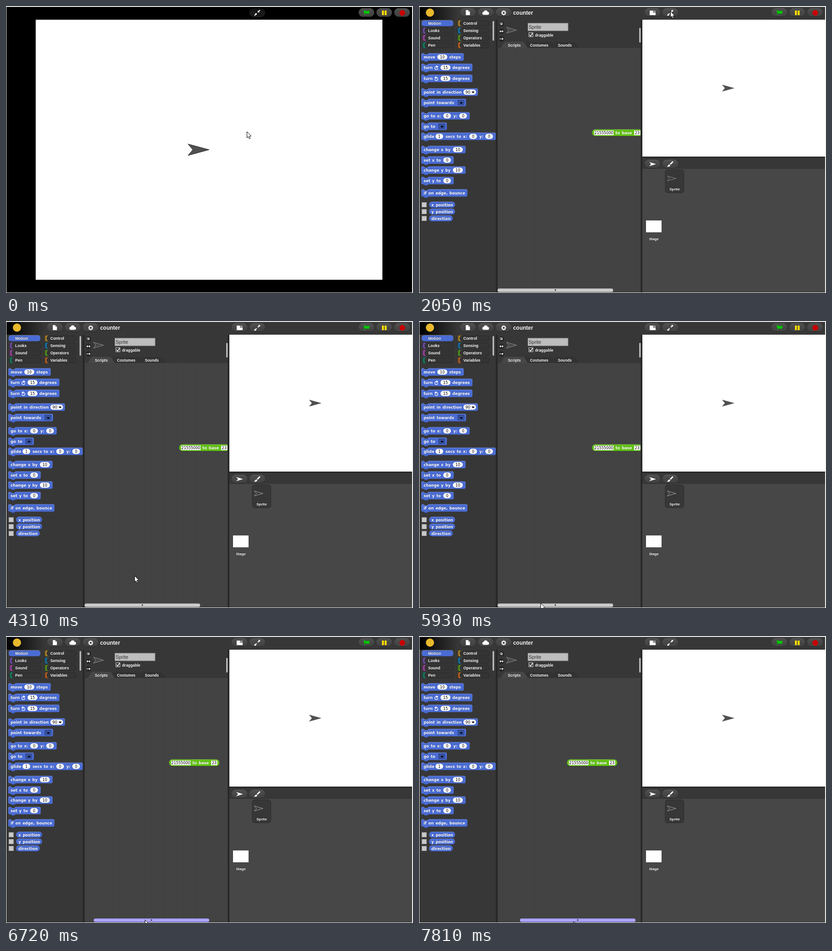
Recreate the animation shown at these times as an HTML page with a canvas. Size 891 by 629 pixels, loop 8000 ms.

```html
<!DOCTYPE html>
<html lang="en">
<head>
<meta charset="utf-8">
<title>Block editor</title>
<style>
  html, body { margin: 0; width: 100%; height: 100%; overflow: hidden; background: #f0f0f0; }
  canvas { display: block; }
</style>
</head>
<body>
<canvas id="view" width="891" height="629"></canvas>
<script>
const ctx = document.getElementById('view').getContext('2d');
const LOOP = 8000;
const SANS = '"Liberation Sans", Arial, sans-serif';
const WIDE = '"DejaVu Sans", Verdana, sans-serif';
const BLUE = '#4a6cd4', GREEN = '#62c213';
const gray = v => `rgb(${v},${v},${v})`;

// ---- drawing helpers ----
function rect(x, y, w, h, fill) {
  ctx.fillStyle = fill;
  ctx.fillRect(x, y, w, h);
}

function frameRect(x, y, w, h, stroke) {
  ctx.strokeStyle = stroke;
  ctx.lineWidth = 1;
  ctx.strokeRect(x, y, w, h);
}

function path(points, fill, stroke, width = 1, open = false) {
  ctx.beginPath();
  points.forEach(([x, y]) => ctx.lineTo(x, y));
  if (!open) ctx.closePath();
  if (fill) { ctx.fillStyle = fill; ctx.fill(); }
  if (stroke) { ctx.strokeStyle = stroke; ctx.lineWidth = width; ctx.stroke(); }
}

function round(x, y, w, h, r, fill, stroke, width = 1) {
  ctx.beginPath();
  ctx.roundRect(x, y, w, h, r);
  if (fill) { ctx.fillStyle = fill; ctx.fill(); }
  if (stroke) { ctx.strokeStyle = stroke; ctx.lineWidth = width; ctx.stroke(); }
}

function disc(x, y, r, fill) {
  ctx.beginPath();
  ctx.arc(x, y, r, 0, Math.PI * 2);
  ctx.fillStyle = fill;
  ctx.fill();
}

function text(str, x, y, font, fill, align = 'left') {
  ctx.font = font;
  ctx.textAlign = align;
  ctx.fillStyle = fill;
  ctx.fillText(str, x, y);
}

function label(str, x, y, size = 8.5, align = 'left') {
  const font = `bold ${size}px ${SANS}`;
  text(str, x - 0.8, y - 0.8, font, 'rgba(0,0,0,.5)', align);
  text(str, x, y, font, '#fff', align);
}

function blockText(str, x, mid) {
  const font = `bold 8.35px ${WIDE}`;
  ctx.wordSpacing = '1.1px';
  text(str, x - 0.8, mid + 2.2, font, 'rgba(0,0,0,.25)');
  text(str, x, mid + 3, font, '#fff');
  ctx.wordSpacing = '0px';
}

function gradient(x0, y0, x1, y1, colors) {
  const g = ctx.createLinearGradient(x0, y0, x1, y1);
  colors.forEach((c, i) => g.addColorStop(i / (colors.length - 1), c));
  return g;
}

const vertical = (y0, y1, ...colors) => gradient(0, y0, 0, y1, colors);
const horizontal = (x0, x1, ...colors) => gradient(x0, 0, x1, 0, colors);
const bevel = (y, h) => vertical(y, y + h, 'rgba(255,255,255,.2)', 'rgba(255,255,255,0)', 'rgba(0,0,0,.25)');

function dart(x, y, w, h, notch, fill, stroke, width) {
  path([[x, y - h], [x + w, y], [x, y + h], [x + notch, y]], fill, stroke, width);
}

// ---- toolbar ----
function pill(cx, cy, pressed) {
  const y = cy - 9.5, base = pressed ? 27 : 71;
  round(cx - 17, y, 34, 19, 9.5,
    vertical(y, y + 19, gray(base + (pressed ? -12 : 8)), gray(base), gray(base - 6)));
  round(cx - 16.5, y + 0.5, 33, 18, 9, null,
    vertical(y, y + 19, pressed ? '#111' : gray(100), gray(pressed ? 44 : 34)));
}

function zoomIcon(cx, cy, inward) {
  for (const s of [-1, 1]) {
    const tip = inward ? 1.3 : 6, tail = inward ? 6 : 1.3, arm = inward ? 5.3 : 2;
    const p = d => [cx + s * d, cy - s * d];
    path([p(tip), p(tail)], null, '#fff', 2, true);
    path([p(tip), [cx + s * arm, cy - s * tip], [cx + s * tip, cy - s * arm]], '#fff');
  }
}

function runButtons() {
  for (const x of [789, 828, 867]) pill(x, 14.5);
  path([[783, 9], [789, 11], [796, 10.5], [795, 17], [789, 17], [785, 15], [786, 20], [784.5, 20]], '#00c800');
  rect(823, 10, 4.3, 10, '#ffdc00');
  rect(829, 10, 4.3, 10, '#ffdc00');
  path(Array.from({ length: 8 }, (_, i) => {
    const a = (i + 0.5) * Math.PI / 4;
    return [867.5 + 6.5 * Math.cos(a), 15 + 6.5 * Math.sin(a)];
  }), '#c80000');
}

function toolbar() {
  rect(1, 2, 888, 28, gray(55));
  rect(1, 2, 167, 28, horizontal(1, 168, '#000', gray(55), gray(55)));
  disc(24, 14.5, 9, '#e8b92c');

  for (const x of [107, 146, 185, 511, 550]) pill(x, 14.5);
  path([[102.5, 9], [108, 9], [111.5, 12.5], [111.5, 20], [102.5, 20]], '#fff');
  path([[108, 9], [108, 12.5], [111.5, 12.5]], gray(130));
  disc(142, 16, 3.3, '#fff');
  disc(146, 13.5, 4, '#fff');
  disc(150, 16, 3.3, '#fff');
  rect(142, 15, 8, 4.3, '#fff');
  for (let i = 0; i < 4; i++) {
    const a = i * Math.PI / 4, x = 5.5 * Math.cos(a), y = 5.5 * Math.sin(a);
    path([[185.5 - x, 15 - y], [185.5 + x, 15 + y]], null, '#fff', 2, true);
  }
  disc(185.5, 15, 4, '#fff');
  disc(185.5, 15, 2.2, gray(60));
  rect(505, 10, 13, 10, '#fff');
  rect(512, 10, 6, 5, gray(150));
  zoomIcon(550, 15, false);
  label('counter', 206, 19, 11.9);
  runButtons();
}

// ---- palette ----
const categories = [
  ['Motion', BLUE], ['Control', '#e6a822'],
  ['Looks', '#8f56e3'], ['Sensing', '#0494dc'],
  ['Sound', '#cf4ad9'], ['Operators', '#62c213'],
  ['Pen', '#00a178'], ['Variables', '#f3761d']
];

// Middle line, right edge, then parts by x: label, [width, value] slot, or icon.
const blocks = [
  [112, 98, { 10: 'move', 40: [22, '10'], 66: 'steps' }],
  [135, 117, { 10: 'turn', 38: 'cw', 47: [22, '15'], 73: 'degrees' }],
  [159, 117, { 10: 'turn', 38: 'ccw', 47: [22, '15'], 73: 'degrees' }],
  [189, 129, { 10: 'point in direction', 97: [28, '90', true] }],
  [212, 103, { 10: 'point towards', 85: 'menu' }],
  [241, 111, { 10: 'go to x:', 53: [17, '0'], 75: 'y:', 88: [17, '0'] }],
  [264, 61, { 10: 'go to', 43: 'menu' }],
  [286, 168, { 10: 'glide', 36: [17, '1'], 58: 'secs to x:', 110: [17, '0'], 132: 'y:', 145: [17, '0'] }],
  [315, 102, { 10: 'change x by', 74: [22, '10'] }],
  [338, 76, { 10: 'set x to', 53: [17, '0'] }],
  [360, 102, { 10: 'change y by', 74: [22, '10'] }],
  [383, 76, { 10: 'set y to', 53: [17, '0'] }],
  [410, 106, { 10: 'if on edge, bounce' }]
];

function blockShape(mid, right) {
  const t = mid - 8.5, b = mid + 8;
  const points = [[5, t + 2], [7, t], [10, t], [13, t + 2.5], [18, t + 2.5], [21, t],
    [right - 2, t], [right, t + 2], [right, b - 2], [right - 2, b],
    [21, b], [18, b + 2.5], [13, b + 2.5], [10, b], [7, b], [5, b - 2]];
  path(points, BLUE);
  ctx.save();
  ctx.clip();
  path(points, null, bevel(t, 18), 2);
  ctx.restore();
}

function turnIcon(x, mid, clockwise) {
  ctx.save();
  ctx.translate(x, mid);
  ctx.scale(clockwise ? 1 : -1, 1);
  ctx.beginPath();
  ctx.arc(0, 1, 3.3, 0, Math.PI * 1.5);
  ctx.strokeStyle = '#fff';
  ctx.lineWidth = 1.2;
  ctx.stroke();
  path([[0, -5], [4.5, -2], [0, 1]], '#fff');
  ctx.restore();
}

function slot(x, mid, [w, value, menu]) {
  round(x, mid - 6, w, 11.5, 5.8, '#fff', 'rgba(0,0,0,.2)', 0.6);
  text(value, x + w / 2 - (menu ? 4 : 0), mid + 3, `8.2px ${WIDE}`, '#000', 'center');
  if (menu) path([[x + 18, mid - 1.5], [x + 25, mid - 1.5], [x + 21.5, mid + 2.5]], '#000');
}

function part(x, mid, item) {
  if (Array.isArray(item)) slot(x, mid, item);
  else if (item === 'cw' || item === 'ccw') turnIcon(x, mid, item === 'cw');
  else if (item === 'menu') {
    rect(x, mid - 6, 14.5, 12, '#37519f');
    path([[x, mid + 6], [x, mid - 6], [x + 14.5, mid - 6]], null, 'rgba(0,0,0,.3)', 1, true);
    path([[x + 4, mid - 1], [x + 11, mid - 1], [x + 7.5, mid + 3]], '#000');
  } else blockText(item, x, mid);
}

function handle(x, y, h) {
  round(x, y, 3.5, h, 1.5, horizontal(x, x + 3.5, gray(160), gray(205), gray(160)));
}

function categoryButton(name, color, x, y, active) {
  if (active) round(x, y, 69, 13, 5, color, bevel(y, 13));
  else {
    ctx.save();
    round(x, y, 71, 13, 5);
    ctx.clip();
    rect(x, y, 12, 13, horizontal(x, x + 7, gray(45), color));
    round(x + 6, y, 72, 13, 5, gray(52));
    ctx.restore();
    round(x + 0.5, y + 0.5, 70, 12, 5, null, 'rgba(0,0,0,.2)');
  }
  label(name, x + 14, y + 9.5);
}

function palette() {
  rect(1, 30, 167, 598, gray(55));
  categories.forEach(([name, color], i) =>
    categoryButton(name, color, i % 2 ? 83 : 6, 31.5 + 16 * (i >> 1), i === 0));
  handle(161, 33, 43);

  ctx.save();
  ctx.beginPath();
  ctx.rect(1, 92, 167, 536);
  ctx.clip();
  for (const [mid, right, parts] of blocks) {
    blockShape(mid, right);
    for (const x in parts) part(+x, mid, parts[x]);
  }
  ['x position', 'y position', 'direction'].forEach((name, i) => {
    const mid = 435.5 + 15 * i;
    rect(6, mid - 5, 10.5, 10.5, gray(200));
    frameRect(6.5, mid - 4.5, 9.5, 9.5, gray(175));
    round(22, mid - 6.5, i < 2 ? 57 : 52, 13, 6.5, BLUE, bevel(mid - 6.5, 13));
    blockText(name, 27, mid);
  });
  ctx.restore();
}

// ---- scripting area ----
function spriteBar() {
  rect(172, 30, 313, 62, gray(55));
  for (const y of [39, 55.5, 72]) disc(180.5, y, 6, gray(38));
  round(177.5, 36.5, 5, 4.5, 1.5, null, '#ddd');
  disc(181, 39.5, 1.6, '#ddd');
  path([[177, 55.5], [184, 55.5]], null, '#fff', 1.2, true);
  path([[179, 53], [176, 55.5], [179, 58]], '#fff');
  path([[182, 53], [185, 55.5], [182, 58]], '#fff');
  path([[176, 72], [184, 72]], null, '#fff', 1.2, true);
  path([[182, 69.5], [185, 72], [182, 74.5]], '#fff');

  dart(191.5, 53, 22, 6.5, 5, gray(70), gray(165), 0.8);
  rect(238, 37.5, 88.5, 17, gray(190));
  frameRect(238.5, 38, 87.5, 16, gray(150));
  text('Sprite', 240, 49.5, `10.6px ${SANS}`, '#333');
  frameRect(240.5, 58.5, 9, 9, gray(215));
  path([[242, 63], [244.5, 66], [248.5, 59.5]], null, '#fff', 1.5, true);
  label('draggable', 254, 66.5, 8.4);
  handle(482, 48, 32);

  [['Sounds', 304, 334, 50], ['Costumes', 243, 283, 50], ['Scripts', 194.5, 222, 71]].forEach(([name, x, end, v]) => {
    path([[x - 15, 92], [x - 9, 81], [x - 6, 78.5], [end + 5, 78.5], [end + 9, 81], [end + 16, 92]], gray(v));
    label(name, x, 88.5, 8.3);
  });
}

function reporter(x) {
  round(x, 270.5, 110, 14.5, 7.2, GREEN, bevel(270.5, 14.5));
  rect(x + 4.5, 273, 42.5, 10, '#fff');
  rect(x + 92, 273, 13.5, 10, '#fff');
  text('21555000', x + 5, 281, `8.1px ${WIDE}`, '#000');
  text('23', x + 93.5, 281, `8.1px ${WIDE}`, '#000');
  blockText('to base', x + 51, 278);
}

function scripts(shift, lit) {
  ctx.save();
  ctx.beginPath();
  ctx.rect(172, 92, 313, 536);
  ctx.clip();
  rect(172, 92, 313, 536, gray(71));
  const pitch = 10 / 3;
  for (let x = 172; x < 485; x += pitch) rect(x, 92, pitch / 4, 536, gray(55));
  reporter(Math.round(379 - shift * 1.125));
  const colors = lit ? ['#988ff0', '#b4acff', '#958cec'] : [gray(180), gray(212), gray(180)];
  round(172 + shift, 619, 253, 8, 4, vertical(619, 627, ...colors));
  disc(298.5 + shift, 622.5, 1.6, '#333');
  ctx.restore();
}

// ---- stage and sprite list ----
function stageSide(t) {
  rect(489, 30, 400, 300, '#fff');
  dart(664, 180, 25.5, 7, 6, gray(80), '#333', 0.5);
  rect(489, 333, 400, 24, gray(55));
  pill(511, 346.5);
  pill(550, 346.5);
  dart(504, 346.5, 15, 4.5, 4, '#fff');
  path([[549, 346], [555, 340], [557, 342], [551, 348]], '#fff');
  path([[548, 347], [550.5, 349.5], [548, 352], [543, 352.5], [545.5, 349]], '#fff');

  rect(489, 357, 400, 271, gray(71));
  round(539.5, 359.5, 40, 49.5, 5, gray(55), gray(38), 1.4);
  round(540.5, 360.5, 38, 47.5, 4, null, gray(66), 0.8);
  dart(543.5, 378, 19, 5.5, 5, gray(60), gray(t < 2450 ? 150 : 185), 0.8);
  label('Sprite', 559.5, 404, 8, 'center');
  rect(497, 470, 34, 26, '#fff');
  if (t >= 2290) rect(512, 482, 1, 1, gray(190));
  label('Stage', 514, 513, 7.8, 'center');
}

function editor(t, shift) {
  rect(1, 2, 888, 626, gray(40));
  toolbar();
  palette();
  spriteBar();
  scripts(shift, t >= 6160);
  stageSide(t);
}

function fullStage() {
  rect(1, 2, 888, 626, '#000');
  rect(65, 30, 759, 570, '#fff');
  dart(398.5, 315, 46, 12.5, 10.5, gray(80), '#222');
  pill(550, 14.5, true);
  zoomIcon(550, 15, true);
  runButtons();
}

// ---- pointer ----
const linear = u => u, easeIn = u => u ** 1.5, easeOut = u => 1 - (1 - u) ** 1.6;
const smooth = u => u * u * (3 - 2 * u);
// Start, end, number of steps, target x and y, easing.
const moves = [
  [40, 730, 10, 549, 11, smooth],
  [970, 970, 1, 550, 11, linear],
  [2990, 3780, 11, 420, 345, easeIn],
  [3850, 4310, 7, 281, 558, easeOut],
  [4700, 5000, 5, 266, 611, smooth],
  [5240, 5390, 3, 266, 616, linear],
  [5540, 5630, 2, 266, 617, linear],
  [5930, 6000, 2, 266, 618, linear],
  [6160, 6720, 8, 304, 622, linear],
  [6790, 6960, 3, 321, 623, linear],
  [7070, 7490, 7, 335, 625, easeOut],
  [7720, 7810, 2, 338, 625, linear]
];

function pointerAt(t) {
  let x = 527, y = 275;
  for (const [start, end, steps, tx, ty, ease] of moves) {
    if (t < start) break;
    const k = end > start ? Math.floor((t - start) / (end - start) * (steps - 1) + 1e-6) + 1 : steps;
    const u = ease(Math.min(1, k / steps));
    x += (tx - x) * u;
    y += (ty - y) * u;
  }
  return [Math.round(x), Math.round(y)];
}

function pointer(x, y) {
  const shape = [[0, 0], [0, 13.5], [3, 10.8], [5, 15.5], [7.3, 14.5], [5.3, 10], [9.3, 9.5]];
  path(shape.map(([dx, dy]) => [x + dx + 0.5, y + dy + 0.5]), '#fff', '#000');
}

function frame() {
  const t = performance.now() % LOOP;
  const [x, y] = pointerAt(t);
  rect(0, 0, 891, 629, '#f0f0f0');
  if (t < 2050) fullStage();
  else editor(t, t < 6160 ? 0 : Math.max(0, Math.min(49, x - 284)));
  pointer(x, y);
  requestAnimationFrame(frame);
}
frame();
</script>
</body>
</html>
```
